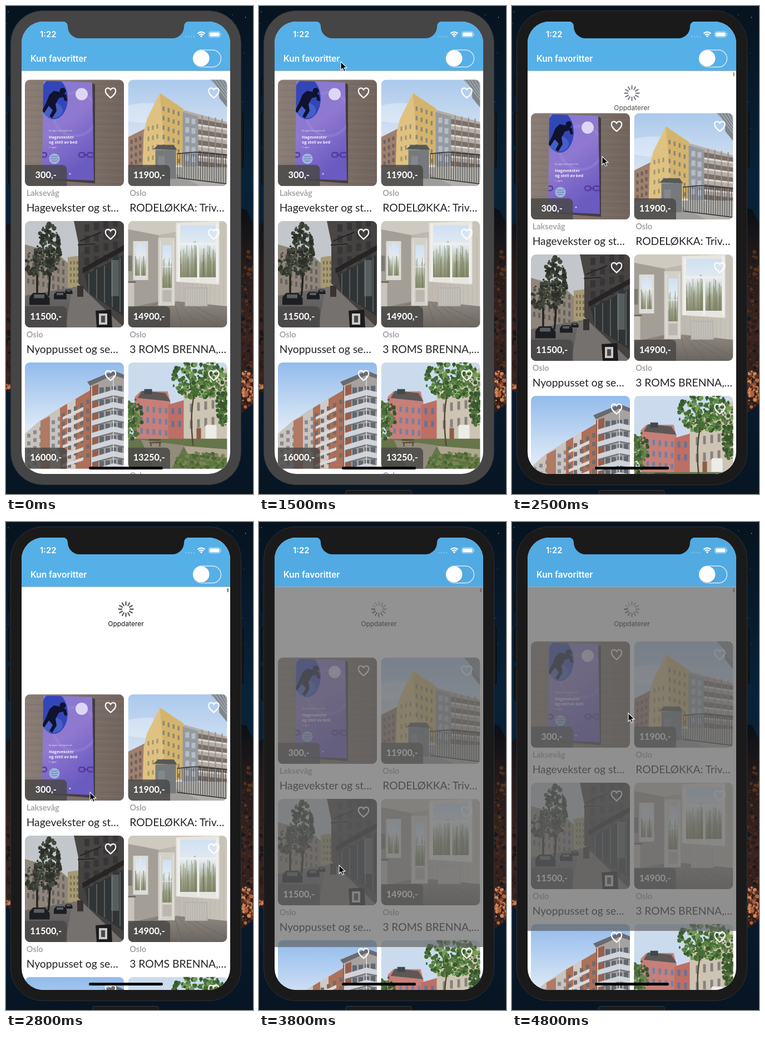
Recreate the animation shown at these times as an HTML page. Size 444x876 px, loop 5000 ms.

```html
<!DOCTYPE html>
<html lang="no">
<head>
<meta charset="utf-8">
<title>Favoritter</title>
<style>
html, body { margin: 0; width: 100%; height: 100%; overflow: hidden; background: #071726; }
svg#stage { display: block; width: 100vw; height: 100vh; }
text { white-space: pre; }
.ui { font-family: Inter, Roboto, sans-serif; }
.card { font-family: Lato, "Open Sans", sans-serif; }
.price { font-size: 16.3px; font-weight: 700; fill: #fff; text-anchor: middle; }
.place { font-size: 14.5px; font-weight: 700; fill: #a6a6a8; }
.title { font-size: 19.3px; fill: #242424; }
.cover { font-family: "Open Sans", "Noto Sans", sans-serif; fill: #f4f0ff; }
</style>
</head>
<body>
<svg id="stage" viewBox="0 0 444 876" preserveAspectRatio="none" xmlns="http://www.w3.org/2000/svg">
  <defs>
    <clipPath id="cardClip"><rect width="178" height="191" rx="9"/></clipPath>
    <clipPath id="screenClip"><rect x="28" y="28" width="375" height="812" rx="39"/></clipPath>
    <clipPath id="listClip"><rect x="28" y="116" width="375" height="724"/></clipPath>
    <clipPath id="bookClip"><path d="M33 2L121 5L124 181L31 177Z"/></clipPath>
    <linearGradient id="night" x2="0" y2="1"><stop stop-color="#06131f"/><stop offset=".35" stop-color="#092238"/><stop offset=".8" stop-color="#081a2c"/><stop offset="1" stop-color="#071523"/></linearGradient>
    <linearGradient id="rock" x2="0" y2="1"><stop stop-color="#0a0f17"/><stop offset=".25" stop-color="#231a1a"/><stop offset=".6" stop-color="#3b241e"/><stop offset="1" stop-color="#2a1c1b"/></linearGradient>
    <linearGradient id="wood" x2="1" y2="0"><stop stop-color="#8a7d76"/><stop offset=".6" stop-color="#7c7069"/><stop offset="1" stop-color="#71645d"/></linearGradient>
    <linearGradient id="purple" x2=".4" y2="1"><stop stop-color="#8579d2"/><stop offset=".5" stop-color="#9079d0"/><stop offset="1" stop-color="#6a5bc0"/></linearGradient>
    <linearGradient id="sky" x2="0" y2="1"><stop stop-color="#abc9ec"/><stop offset=".7" stop-color="#e2eaf4"/></linearGradient>
    <linearGradient id="deepSky" x2="0" y2="1"><stop stop-color="#92bbec"/><stop offset=".6" stop-color="#dce8f6"/></linearGradient>
    <linearGradient id="street" x2="0" y2="1"><stop stop-color="#6d6b6a"/><stop offset="1" stop-color="#535153"/></linearGradient>
    <linearGradient id="outlook" x2="0" y2="1"><stop stop-color="#cfe0f4"/><stop offset=".4" stop-color="#e3ebf0"/><stop offset=".75" stop-color="#a5aa92"/><stop offset="1" stop-color="#8c8f74"/></linearGradient>
    <linearGradient id="wall" x2="1" y2="0"><stop stop-color="#a9a59d"/><stop offset=".35" stop-color="#bcb7ae"/><stop offset="1" stop-color="#c9c4ba"/></linearGradient>
    <linearGradient id="floor" x2="0" y2="1"><stop stop-color="#8f8881"/><stop offset="1" stop-color="#6a6560"/></linearGradient>
  </defs>

  <rect width="444" height="876" fill="url(#night)"/>
  <g id="scenery"></g>
  <rect id="dock" x="156" y="869.5" width="118" height="12" rx="3" fill="#191a1b" stroke="#3d3d3d"/>

  <g fill="#17181a" stroke="#050607">
    <rect x="4.500" y="128" width="8" height="32" rx="2"/><rect x="4.500" y="190" width="8" height="60" rx="2"/>
    <rect x="4.500" y="260" width="8" height="60" rx="2"/><rect x="418" y="191" width="8.500" height="99" rx="2"/>
  </g>
  <rect id="body" x="8.500" y="8.500" width="414" height="851" rx="58" stroke="#303032"/>

  <g clip-path="url(#screenClip)">
    <rect x="28" y="28" width="375" height="812" fill="#fff"/>
    <g clip-path="url(#listClip)">
      <g id="refresh">
        <g id="spinner" transform="translate(215.500 156.500)" stroke="#555a66" stroke-width="2.300" stroke-linecap="round"></g>
        <text class="ui" x="215.500" y="187" font-size="12" text-anchor="middle" fill="#161616">Oppdaterer</text>
        <rect x="397.500" y="119" width="2.500" height="7" rx="1.200" fill="#777"/>
      </g>
      <g id="list" class="card"></g>
      <rect id="shade" x="28" y="116" width="375" height="600" fill="#626262"/>
    </g>
    <rect id="header" x="28" y="28" width="375" height="88"/>
    <path d="M28 116.300H403" stroke="#a3afba"/>
    <g class="ui" fill="#fff" font-weight="600">
      <text x="61" y="56" font-size="14.800">1:22</text>
      <text x="44" y="99.500" font-size="15.400">Kun favoritter</text>
    </g>
    <g fill="#fff" opacity=".3"><circle cx="323" cy="55" r="1.200"/><circle cx="328" cy="55" r="1.200"/><circle cx="333" cy="55" r="1.200"/><circle cx="338" cy="55" r="1.200"/></g>
    <g fill="none" stroke="#fff" stroke-width="2.200"><path d="M344.500 49.300Q351 43.800 357.500 49.300M347 52Q351 48.700 355 52"/></g>
    <path d="M348.600 53.700Q351 51.900 353.400 53.700L351 56.300Z" fill="#fff"/>
    <rect x="364.500" y="46" width="20.500" height="10" rx="2.800" fill="none" stroke="#fff" opacity=".6"/>
    <rect x="366" y="47.500" width="17.500" height="7" rx="1.500" fill="#fff"/><path d="M386.500 49.500v3.500" stroke="#fff" opacity=".6"/>
    <rect x="336.500" y="79" width="50" height="30.500" rx="15.200" fill="none" stroke="#dfe6f0" stroke-width="1.500"/>
    <circle cx="351.500" cy="95" r="14.700" fill="#24587c" opacity=".25"/><circle cx="351" cy="94" r="14.600" fill="#fff"/>
    <rect x="149" y="827" width="133" height="5" rx="2.500" fill="#000"/>
  </g>
  <path id="notch" d="M102 27.500A9 9 0 0 1 111 37A21 21 0 0 0 132 58H299A21 21 0 0 0 320 37A9 9 0 0 1 329 27.500Z"/>
  <path id="cursor" d="M0 0V15L3.500 11.800L6 17.400L8.500 16.300L6.100 10.900H10.900Z" fill="#000" stroke="#fff" stroke-width="1.100"/>
</svg>

<script>
const $ = id => document.getElementById(id);

function seeded(seed) {
  return () => (seed = (seed * 16807) % 2147483647) / 2147483647;
}
const repeat = (n, draw) => Array.from({ length: n }, (_, i) => draw(i)).join('');
const rect = (x, y, w, h, fill, extra = '') => `<rect x="${x}" y="${y}" width="${w}" height="${h}" fill="${fill}" ${extra}/>`;
const shape = (d, fill, extra = '') => `<path d="${d}" fill="${fill}" ${extra}/>`;
const line = (d, color, width = 1) => shape(d, 'none', `stroke="${color}" stroke-width="${width}"`);
const disc = (x, y, r, fill, extra = '') => `<circle cx="${x}" cy="${y}" r="${r}" fill="${fill}" ${extra}/>`;

// Grid of equal panes; slope shifts each column down (or up) for perspective.
const panes = (x, y, cols, rows, dx, dy, w, h, fill, slope = 0) =>
  repeat(cols * rows, i => {
    const c = i % cols, r = Math.floor(i / cols);
    return rect(x + c * dx, y + r * dy + c * slope, w, h, fill);
  });

function foliage(seed, n, cx, cy, rx, ry, colors, size) {
  const rnd = seeded(seed);
  return repeat(n, () => {
    const a = rnd() * 6.283, d = Math.sqrt(rnd());
    const color = colors[Math.floor(rnd() * colors.length)];
    return disc((cx + rx * d * Math.cos(a)).toFixed(1), (cy + ry * d * Math.sin(a)).toFixed(1), (size * (.4 + rnd())).toFixed(1), color);
  });
}

function book() {
  const rnd = seeded(31);
  const grain = repeat(32, i => line(`M0 ${i * 6}q${40 + rnd() * 60} ${rnd() * 6 - 3} 178 ${rnd() * 4}`, i % 2 ? '#5e514b40' : '#a0938a40', .9));
  const chain = x => `<g fill="none" stroke="#553a9c" stroke-width="2.400"><rect x="${x}" y="131" width="11" height="8" rx="3.500"/><path d="M${x + 8} 135h9"/><rect x="${x + 15}" y="131" width="12" height="8" rx="3.500"/></g>`;
  return rect(0, 0, 178, 191, 'url(#wood)') + grain +
    shape('M36 176L121 6L126 9L126 186L40 180Z', '#2d2530', 'opacity=".7"') +
    shape('M33 2L121 5L124 181L31 177Z', 'url(#purple)') +
    '<g clip-path="url(#bookClip)">' +
    disc(90, 62, 39, 'none', 'stroke="#a391dc" stroke-width="5" opacity=".3"') +
    '<ellipse cx="52" cy="34" rx="25" ry="37" fill="#3346b8"/><ellipse cx="50" cy="55" rx="18" ry="14" fill="#5370d4" opacity=".6"/>' +
    disc(68, 20, 5.5, '#10122e') +
    shape('M62 22L74 27L76 38L71 38L69 31L61 33L55 44L57 56L49 69L44 66L50 55L43 47L35 59L30 57L38 42L44 27L52 20Z', '#10122e') +
    disc(102, 26, 11, '#ddd6f4') + chain(97) + chain(12) +
    disc(53, 142, 9.5, '#9fb6dc') + line('M47 138h12M46 142h14M48 146h10', '#5f68aa', 1.1) + '</g>' +
    '<g class="cover"><text x="43" y="93" font-size="3.300">Ny utgave med register bak</text>' +
    '<text x="43" y="105.500" font-size="7.200" font-weight="700">Hagevekster</text><text x="43" y="114.500" font-size="7.200" font-weight="700">og stell av bed</text>' +
    '<text x="43" y="123" font-size="3.300">2. utgave</text></g>' + disc(81, 169, 1.5, '#d5c8f4');
}

function yellowBlock() {
  return rect(0, 0, 178, 191, 'url(#sky)') +
    '<ellipse cx="35" cy="60" rx="55" ry="18" fill="#fff" opacity=".3"/>' +
    shape('M0 103L30 88L36 165H0Z', '#a0806e') + panes(4, 108, 4, 4, 8, 13, 4, 7, '#6d6160', -3) +
    shape('M98 54L178 76V175H98Z', '#b5aea6') +
    repeat(5, i => shape(`M124 ${70 + i * 19}L178 ${80 + i * 18}v8L124 ${79 + i * 19}Z`, '#7a6f69') + line(`M124 ${81 + i * 19}L178 ${89 + i * 18}`, '#dcdad5', 3)) +
    panes(132, 64, 4, 5, 12, 19, 2, 18, '#958b84', 2) +
    shape('M28 95L34 70L57 24L99 52V153L26 162Z', '#dfc282') + shape('M57 24L99 52V153L68 150Z', '#d4b46c') +
    panes(62, 48, 4, 6, 9, 17, 3.5, 8, '#8c8679', 3) + panes(35, 84, 3, 4, 8, 18, 3, 8, '#a3926f', -2) +
    shape('M98 58L126 66V156H98Z', '#959aa0') + panes(103, 68, 2, 5, 11, 17, 7, 10, '#b4bcc6', 2) +
    shape('M148 0H178V50L164 33L162 15Z', '#808689') + repeat(5, i => line(`M${150 + i * 6} 0L178 ${36 - i * 6}`, '#a9b4bd', 1.3)) +
    rect(0, 157, 178, 34, '#b1afa9') + shape('M0 166L52 152L130 191H0Z', '#9e9d9a') +
    rect(49, 126, 37, 52, '#777a7d') + shape('M45 125L54 117H82L88 126Z', '#55585b') + rect(54, 137, 12, 38, '#85888b') +
    line('M88 133L120 130L178 135M88 176L178 187', '#282a2d', 1.6) + repeat(22, i => line(`M${89 + i * 4.1} ${132 + i * .1}V${177 + i * .4}`, '#3b3d41', .9));
}

function street() {
  return rect(0, 0, 178, 191, '#c3c7cc') +
    shape('M0 42L58 58L78 76V140H0Z', '#8f867b') + panes(4, 58, 8, 4, 9, 15, 4, 9, '#67625d', 2) +
    shape('M77 65L100 62V130H77Z', '#a69a74') + panes(81, 72, 3, 4, 6, 11, 3, 6, '#7c7353') +
    shape('M0 134L78 120H102L178 191H0Z', 'url(#street)') + shape('M86 118H102L178 172V191H72Z', '#75716f') +
    shape('M96 0H178V191L112 128L96 112Z', '#45423f') + shape('M88 0H130V38L100 58Z', '#4a4643') +
    panes(107, 6, 4, 5, 17, 20, 9, 13, '#35363a', -3) +
    shape('M103 85L178 43V53L104 94Z', '#262424') + shape('M108 97L177 61V171L114 129Z', '#2f3436') +
    repeat(5, i => line(`M${115 + i * 14} ${94 - i * 7}V${131 + i * 8}`, '#6b665f', 1.6)) + rect(155, 70, 14, 65, '#7e8585', 'opacity=".5"') +
    line('M99 36L137 20M95 43L126 41', '#262525', 2) +
    line('M42 135Q47 100 43 48M22 132V85', '#25241f', 3.5) +
    foliage(77, 190, 43, 51, 21, 46, ['#2b2f28', '#363b31', '#454b3f'], 3) + foliage(12, 55, 15, 74, 14, 24, ['#32362e', '#434839'], 2.8) +
    repeat(3, i => `<g transform="translate(${[8, 52, 72][i]} ${[129, 127, 123][i]}) scale(${[1.35, .85, .5][i]})">` +
      shape('M0 14V6L5 0H21L27 7V16H0Z', '#1d1e22') + rect(6, 2, 14, 5, '#5a5f64') + '</g>') +
    rect(94, 116, 11, 20, '#383332') + shape('M127 161L155 159L157 191H129Z', '#1c1c1e') + rect(133, 166, 15, 20, '#c9c7c4') + rect(137, 170, 7, 12, '#4a484b');
}

function room() {
  const outlook = (x, y, w, h, seed) => {
    const rnd = seeded(seed);
    return rect(x, y, w, h, 'url(#outlook)') + repeat(Math.round(w * .6), () => {
      const px = x + rnd() * w, top = y + h * (.3 + rnd() * .45);
      return line(`M${px.toFixed(1)} ${(y + h).toFixed(1)}V${top.toFixed(1)}`, '#737a5a80', 1.2);
    });
  };
  return rect(0, 0, 178, 191, 'url(#wall)') + shape('M0 0H178L155 5L56 25L0 15Z', '#cfcabf') +
    shape('M0 15L55 26V146L0 158Z', '#a39f97') +
    repeat(16, i => line(`M${60 + i * 8} 28V150`, '#b0aba3', .5)) +
    shape('M0 157L55 144H88L178 153V191H0Z', 'url(#floor)') + repeat(8, i => line(`M${55 + i * 7} 146L${i * 32 - 30} 191`, '#625c57', .6)) +
    rect(9, 36, 27, 70, '#dddbd5') + outlook(13, 41, 19, 57, 9) + line('M22 39V100M11 62H35', '#e7e6e2', 2) +
    rect(54, 30, 30, 122, '#d3d0c8') + outlook(62, 43, 16, 77, 15) + line('M58 35V149M81 35V149M60 82H80', '#e4e2dc', 1.6) + rect(62, 124, 16, 21, '#bbb7b0') +
    shape('M86 3L164 0V114L86 109Z', '#e7e5e0') + outlook(94, 8, 64, 93, 26) +
    line('M88 41H162M126 41V109M91 6V108M160 4V110', '#f0efeb', 4) +
    rect(102, 119, 41, 34, '#b6b3ad', 'rx="1"') + panes(104, 121, 9, 1, 4.2, 1, 3, 30, '#c2bfb9') +
    rect(0, 111, 11, 44, '#c8c4bc') + rect(0, 108, 14, 3, '#716c66') + rect(0, 62, 7, 28, '#7d7973');
}

function balconies() {
  return rect(0, 0, 178, 191, 'url(#deepSky)') +
    shape('M0 128L25 106L74 74V191H0Z', '#c9c3be') + panes(4, 128, 6, 5, 11, 14, 6, 7, '#868b92', -6) +
    shape('M28 105L45 96V191H28Z', '#b07a64') + shape('M63 82L119 49V191H63Z', '#ad7058') + shape('M76 74L91 64V191H76Z', '#d0cac6') +
    panes(66, 91, 5, 7, 11, 16, 6, 8, '#746b6c', -6) +
    repeat(6, i => shape(`M68 ${98 + i * 17}L105 ${80 + i * 18}v6L68 ${103 + i * 17}Z`, '#d9d8d7')) +
    shape('M117 38L159 22L178 27V191H117Z', '#a6a2a0') + shape('M112 35L160 15L178 22V29L159 23L117 42Z', '#6a6a6f') +
    shape('M117 44L132 39V191H117Z', '#96604d') + panes(134, 45, 4, 7, 11, 22, 8, 14, '#626870', -1) +
    repeat(7, i => shape(`M119 ${61 + i * 22}L159 ${49 + i * 22}L178 ${53 + i * 22}v9L159 ${59 + i * 22}L119 ${70 + i * 22}Z`, '#cfd4da') +
      line(`M119 ${71 + i * 22}L159 ${60 + i * 22}L178 ${64 + i * 22}`, '#6f7075', 2)) +
    line('M120 42V191M159 24V191', '#d7d8da', 1.6);
}

function garden() {
  return rect(0, 0, 178, 191, '#cbdbed') +
    shape('M12 62L22 52H71L76 71V137H13Z', '#c77f78') + shape('M17 64L25 51L67 55L76 70Z', '#5c5856') + rect(29, 48, 14, 9, '#41474a') +
    panes(22, 78, 5, 3, 11, 20, 4.5, 10, '#7180a3', 1) + shape('M72 76L103 67V142H72Z', '#bd6f66') + panes(78, 82, 2, 2, 12, 23, 5, 11, '#667395') +
    shape('M100 42L178 10V158H100Z', '#cec4b3') + panes(111, 74, 5, 2, 13, 30, 5, 15, '#85837f', -2) +
    rect(123, 118, 8, 34, '#8f5a4a') + rect(139, 112, 20, 44, '#ecece8', 'rx="3"') +
    rect(0, 137, 178, 54, '#66754a') + shape('M23 139L101 149L78 191H47Z', '#928c7b') + shape('M100 150L178 156V171L107 164Z', '#b0a792') +
    foliage(44, 120, 9, 101, 16, 36, ['#36552f', '#4a6c38', '#658548'], 3) +
    foliage(58, 330, 128, 30, 50, 36, ['#36572f', '#466d35', '#5a8342', '#769b58'], 3) +
    foliage(90, 110, 172, 78, 13, 36, ['#38562f', '#527539'], 2.8) +
    line('M119 57Q110 96 117 150', '#514936', 2.5) +
    foliage(17, 150, 132, 177, 48, 15, ['#4b6633', '#5d783f', '#778752'], 2.8) +
    line('M37 139h22M38 144h22M41 145v6M57 145v6', '#554737', 2);
}

const cards = [
  [book, '300,-', 'Laksevåg', 'Hagevekster og st…'],
  [yellowBlock, '11900,-', 'Oslo', 'RODELØKKA: Triv…'],
  [street, '11500,-', 'Oslo', 'Nyoppusset og se…'],
  [room, '14900,-', 'Oslo', '3 ROMS BRENNA,…'],
  [balconies, '16000,-', '', ''],
  [garden, '13250,-', 'Oslo', '']
];

$('list').innerHTML = cards.map(([picture, price, place, title], i) => `
  <g transform="translate(${34 + i % 2 * 185.5} ${132.3 + Math.floor(i / 2) * 253.7})">
    <g clip-path="url(#cardClip)">${picture()}
      <path d="M0 153H66Q75.500 153 75.500 162V191H0Z" fill="#494746" opacity=".82"/></g>
    <path d="M154 32.500C148 27.500 144.800 24.500 144.800 20.400C144.800 14.500 151.200 13.200 154 18C156.800 13.200 163.200 14.500 163.200 20.400C163.200 24.500 160 27.500 154 32.500Z" fill="none" stroke="#fff" stroke-width="2.300" opacity=".93"/>
    <text class="price" x="37.700" y="176.500">${price}</text>
    <text class="place" x="2.700" y="208.500">${place}</text><text class="title" x="2.700" y="237">${title}</text>
  </g>`).join('');

$('spinner').innerHTML = repeat(12, i => `<path d="M0-7.500V-13" transform="rotate(${i * 30})"/>`);

const rnd = seeded(5);
$('scenery').innerHTML =
  repeat(150, () => disc((rnd() * 444).toFixed(1), (rnd() * 360).toFixed(1), (.3 + rnd() * .5).toFixed(2), '#b9cbd8', `opacity="${(.3 + rnd() * .6).toFixed(2)}"`)) +
  shape('M0 394L14 385V698L0 690ZM420 362L432 366L444 390V716L420 733Z', 'url(#rock)') +
  foliage(61, 120, 436, 560, 13, 120, ['#48291f', '#2a1b1b', '#55321f', '#161820'], 2.5) +
  foliage(23, 80, 433, 690, 13, 36, ['#b5623a', '#d08757', '#8a4a2b', '#55302a'], 2.6) +
  foliage(8, 35, 3, 590, 7, 90, ['#2a1b1c', '#402620', '#16171d'], 2.5) +
  foliage(19, 12, 3, 684, 5, 5, ['#a95d39', '#c67b51'], 2);

// Keyed values, linear between points: [time, value, ...].
function track(...points) {
  return t => {
    const next = points.findIndex(p => p[0] > t);
    if (next < 0) return points[points.length - 1].slice(1);
    if (next === 0) return points[0].slice(1);
    const [a, b] = [points[next - 1], points[next]];
    const k = (t - a[0]) / (b[0] - a[0]);
    return a.slice(1).map((v, i) => v + (b[i + 1] - v) * k);
  };
}

const pointer = track([800, 300, 3], [1000, 428, 20], [1300, 190, 108], [1500, 147, 100], [1800, 153, 119],
  [2300, 165, 184], [2500, 162, 270], [2800, 151, 485], [3000, 149, 510], [3300, 147, 504],
  [3500, 146, 545], [3800, 144, 616], [4800, 209, 343]);
const pull = track([2300, 0], [2500, 60], [2800, 177], [3000, 187], [3300, 183], [3500, 165], [3800, 111], [4000, 95], [4300, 84], [4500, 82]);
const dim = track([3300, 0], [3500, .35], [3800, .69], [4300, .71]);
const spokes = [...$('spinner').children];

function render(t) {
  const [x, y] = pointer(t), [offset] = pull(t), [shade] = dim(t);
  const active = t >= 2300, refreshing = t >= 3500;
  const frame = active ? '#1a1a1b' : '#454545';
  $('body').setAttribute('fill', frame);
  $('notch').setAttribute('fill', frame);
  $('header').setAttribute('fill', refreshing ? '#51aae2' : '#55b0e8');
  $('dock').style.display = t >= 1000 ? '' : 'none';
  $('cursor').style.display = t >= 800 ? '' : 'none';
  $('cursor').setAttribute('transform', `translate(${x} ${y})`);
  $('list').setAttribute('transform', `translate(0 ${offset})`);
  $('refresh').setAttribute('opacity', Math.min(1, offset / 80));
  $('shade').setAttribute('height', 536 + offset);
  $('shade').setAttribute('opacity', shade);
  const lead = Math.floor(t / 83.3);
  spokes.forEach((spoke, i) => spoke.setAttribute('opacity', refreshing ? 1 - ((lead - i + 120) % 12) / 16 : 1));
}

// The picture advances twice per half second: at 0 and at 300 ms.
function tick() {
  const t = performance.now() % 5000, part = t % 500;
  render(t - part + (part >= 300 ? 300 : 0));
  requestAnimationFrame(tick);
}
tick();
</script>
</body>
</html>
```
